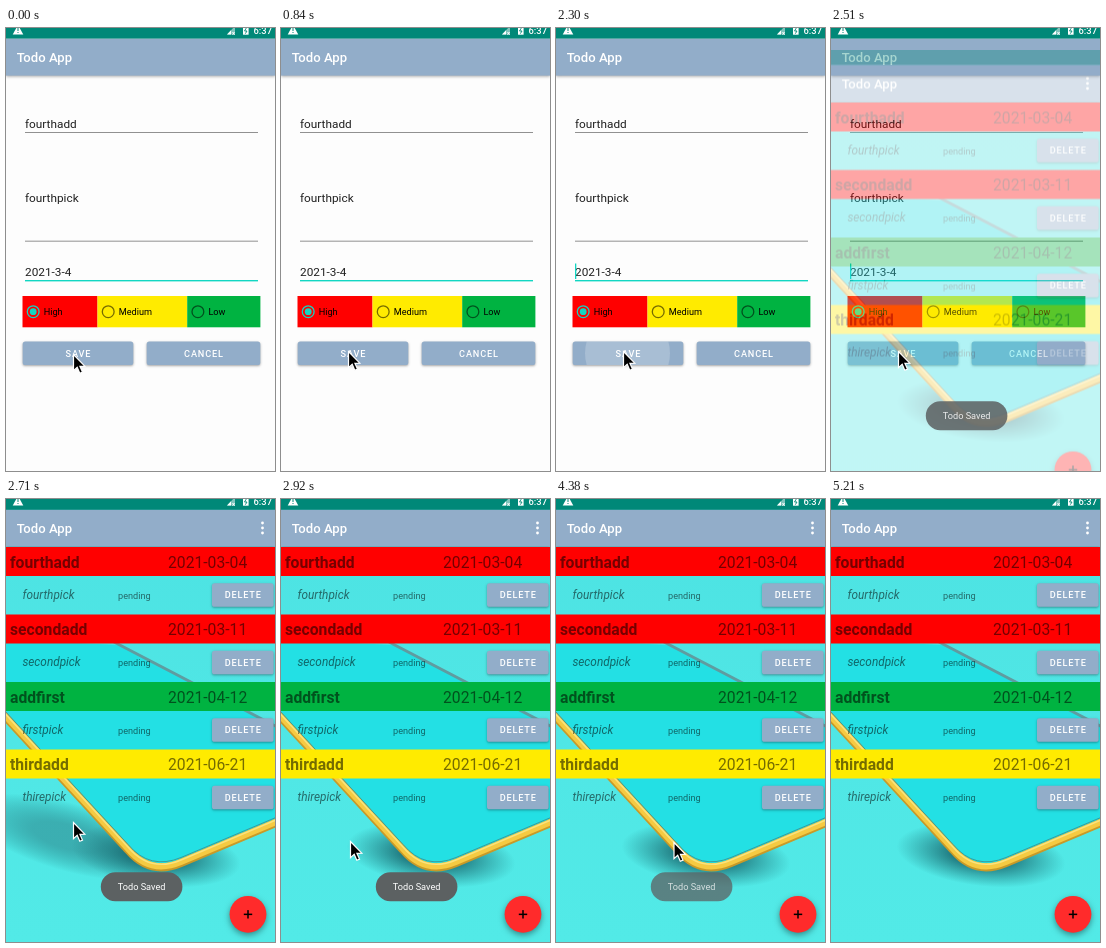
These frames come from a looping animation (269x443 px, 5420 ms). An HTML page with a canvas:

```html
<!DOCTYPE html>
<html lang="en">
<head>
<meta charset="utf-8">
<title>Todo App</title>
<style>
  html, body { margin: 0; width: 100%; height: 100%; overflow: hidden; background: #fdfdfd; }
  canvas { display: block; width: 269px; height: 443px; }
</style>
</head>
<body>
<canvas id="stage" width="269" height="443"></canvas>
<script>
const W = 269, H = 443, LOOP = 5420;
const ctx = document.getElementById('stage').getContext('2d');

const BLUE = '#92adc9', TEAL = '#008878', RED = '#ff0000', GREEN = '#00b341', YELLOW = '#ffeb00';
const MUTED = 'rgba(0,0,0,0.54)', INK = '#202020', ACCENT = '#12d6c2';

const todos = [
  ['fourthadd', '2021-03-04', 'fourthpick', RED],
  ['secondadd', '2021-03-11', 'secondpick', RED],
  ['addfirst', '2021-04-12', 'firstpick', GREEN],
  ['thirdadd', '2021-06-21', 'thirepick', YELLOW]
];

// Stepped tracks: [start time, value...]
const pointerTrack = [
  [0, 67.5, 326.5], [210, 67.5, 323.5], [2920, 69.5, 342.5], [3130, 158, 406.5],
  [3330, 89.5, 352.5], [3540, 109.5, 397.5], [3750, 176, 373.5], [3960, 77.5, 365.5],
  [4170, 144.5, 398.5], [4380, 118, 343.5], [4590, 85.5, 389.5], [4800, 131.5, 407.5],
  [5010, 192.5, 426.5], [5210, -50, -50]
];
const caretTrack = [[0, 0], [210, 1], [840, 0], [1250, 1], [1670, 0], [2300, 1]];
const toastTrack = [[0, 0], [2510, 0.86], [2710, 1], [4380, 0.75], [4590, 0.3], [4800, 0]];

const at = (track, t) => track.filter(key => key[0] <= t).pop().slice(1);

function rect(x, y, w, h, color) {
  ctx.fillStyle = color;
  ctx.fillRect(x, y, w, h);
}

function text(str, x, y, size, color, { style = '', align = 'left', spacing = 0 } = {}) {
  ctx.font = `${style} ${size}px Roboto, sans-serif`;
  ctx.letterSpacing = spacing + 'px';
  ctx.textAlign = align;
  ctx.fillStyle = color;
  ctx.fillText(str, x, y);
  ctx.letterSpacing = '0px';
}

function path(points, close) {
  ctx.beginPath();
  points.forEach(([x, y]) => ctx.lineTo(x, y));
  if (close) ctx.closePath();
}

function disc(x, y, r, color) {
  ctx.beginPath();
  ctx.arc(x, y, r, 0, Math.PI * 2);
  ctx.fillStyle = color;
  ctx.fill();
}

function pill(x, y, w, h, r, color) {
  ctx.beginPath();
  ctx.roundRect(x, y, w, h, r);
  ctx.fillStyle = color;
  ctx.fill();
}

function withShadow(blur, dy, alpha, draw) {
  ctx.save();
  ctx.shadowColor = `rgba(0,0,0,${alpha})`;
  ctx.shadowBlur = blur;
  ctx.shadowOffsetY = dy;
  draw();
  ctx.restore();
}

function button(label, x, y, w, h, ripple) {
  withShadow(2.5, 1, 0.35, () => pill(x, y, w, h, 2.6, BLUE));
  if (ripple) {
    ctx.save();
    ctx.beginPath();
    ctx.roundRect(x, y, w, h, 2.6);
    ctx.clip();
    disc(71.5, y + h / 2, 42.5, 'rgba(255,255,255,0.2)');
    ctx.restore();
  }
  text(label, x + w / 2 + 0.4, y + h / 2 + 3.3, 9.16, '#fff', { style: '500', align: 'center', spacing: 0.82 });
}

function statusBar() {
  rect(0, 0, W, 10.6, TEAL);
  path([[12, -3], [17.3, 6.5], [6.7, 6.5]], true);
  ctx.fillStyle = '#fff';
  ctx.fill();
  rect(11.5, 0, 1, 3, TEAL);
  rect(11.5, 4, 1, 1, TEAL);
  path([[229, -2], [229, 6.5], [221, 6.5]], true);
  ctx.fillStyle = 'rgba(255,255,255,0.5)';
  ctx.fill();
  path([[225, 2.3], [225, 6.5], [221, 6.5]], true);
  ctx.fillStyle = '#fff';
  ctx.fill();
  text('x', 226, 6.5, 6, '#fff', { style: '700' });
  rect(237, -2, 5.6, 8.7, '#fff');
  path([[240.3, 0], [238.5, 3], [241, 3], [239.3, 5.7]]);
  ctx.strokeStyle = TEAL;
  ctx.lineWidth = 0.9;
  ctx.stroke();
  text('6:37', 247.5, 6.2, 9.4, '#fff', { style: '500' });
}

function appBar() {
  withShadow(3, 1, 0.35, () => rect(0, 10.6, W, 37, BLUE));
  text('Todo App', 10.7, 34, 13.1, '#fff', { style: '500' });
}

function radio(label, x, w, color, checked) {
  rect(x, 268, w, 31.3, color);
  const cx = x + 10.7, cy = 283.7;
  const tint = checked ? ACCENT : MUTED;
  ctx.beginPath();
  ctx.arc(cx, cy, 5.9, 0, Math.PI * 2);
  ctx.strokeStyle = tint;
  ctx.lineWidth = 1.3;
  ctx.stroke();
  if (checked) disc(cx, cy, 3.4, tint);
  text(label, x + 21.2, 287, 9.16, '#000');
}

function formScreen(caret, ripple) {
  rect(0, 0, W, H, '#fdfdfd');
  appBar();
  [['fourthadd', 99.5], ['fourthpick', 173.7], ['2021-3-4', 247.7]]
    .forEach(([value, y]) => text(value, 19, y, 11.8, INK));
  rect(19, 104, 233, 0.9, '#858585');
  rect(19, 212.7, 233, 0.9, '#858585');
  rect(19, 252, 233, 1.4, ACCENT);
  if (caret) rect(19, 235.5, 1.3, 15.5, ACCENT);
  radio('High', 16.5, 75, RED, true);
  radio('Medium', 91.5, 89.7, YELLOW);
  radio('Low', 181.2, 73.2, GREEN);
  button('SAVE', 16.7, 313.4, 110.6, 23.6, ripple);
  button('CANCEL', 140.7, 313.4, 113.6, 23.6);
}

function softEllipse(x, y, rx, ry, angle, color) {
  ctx.save();
  ctx.translate(x, y);
  ctx.rotate(angle);
  ctx.scale(rx, ry);
  const g = ctx.createRadialGradient(0, 0, 0.35, 0, 0, 1);
  g.addColorStop(0, color);
  g.addColorStop(1, 'rgba(30,120,125,0)');
  disc(0, 0, 1, g);
  ctx.restore();
}

function phoneOutline() {
  ctx.beginPath();
  ctx.moveTo(-8, 209);
  ctx.lineTo(122, 350);
  ctx.quadraticCurveTo(144, 376, 175, 363);
  ctx.lineTo(277, 320);
}

function wallpaper(settled) {
  const g = ctx.createLinearGradient(0, 40, 0, H);
  g.addColorStop(0, '#4de3e3');
  g.addColorStop(1, '#52eae7');
  rect(0, -20, W, H + 20, g);

  if (!settled) softEllipse(62, 338, 105, 34, 0.28, 'rgba(50,150,155,0.7)');
  softEllipse(150, 356, 85, 31, 0.12, 'rgba(25,105,112,0.85)');

  phoneOutline();
  ctx.lineTo(277, 231);
  ctx.lineTo(112, 146);
  ctx.lineTo(-8, 140);
  ctx.closePath();
  ctx.fillStyle = '#23e0e4';
  ctx.fill();

  path([[108, 143], [277, 231]]);
  ctx.strokeStyle = '#5f9ca0';
  ctx.lineWidth = 3;
  ctx.stroke();
  [['#c89a28', 8, 1], ['#f5ca42', 6, 0], ['#f9e27c', 1.5, -2], ['#3a9c9c', 1, -4.5]].forEach(([color, width, dy]) => {
    ctx.save();
    ctx.translate(0, dy);
    phoneOutline();
    ctx.strokeStyle = color;
    ctx.lineWidth = width;
    ctx.stroke();
    ctx.restore();
  });
}

function listScreen(settled) {
  wallpaper(settled);
  rect(0, -5, W, 15.6, TEAL);
  appBar();
  [24, 29, 34].forEach(y => disc(256.5, y, 1.4, '#fff'));
  todos.forEach(([title, date, note, color], i) => {
    const y = 48 + i * 67.5;
    rect(0, y, W, 29, color);
    text(title, 4, y + 20.6, 15.7, MUTED, { style: '700' });
    text(date, 162, y + 20.6, 15.7, MUTED);
    text(note, 16.4, y + 51.7, 11.8, MUTED, { style: 'italic' });
    text('pending', 112, y + 51.5, 9.16, MUTED);
    button('DELETE', 206, y + 36.2, 61.6, 23.6);
  });
  withShadow(6, 2.5, 0.4, () => disc(242, 415.3, 18.4, '#ff2b2b'));
  rect(237.8, 414.6, 8.4, 1.5, '#000');
  rect(241.25, 411.1, 1.5, 8.4, '#000');
}

// Renders the list off to the side so the crossfade applies to it as a whole.
const main = ctx.canvas;
const layer = document.createElement('canvas');
layer.width = W;
layer.height = H + 10;
let draw = null;

function crossfadeLayer() {
  const layerCtx = layer.getContext('2d');
  ctx.clearRect(0, 0, W, H);
  ctx.save();
  ctx.translate(0, 5);
  listScreen(true);
  ctx.restore();
  layerCtx.clearRect(0, 0, W, layer.height);
  layerCtx.drawImage(main, 0, 0);
}

function toast(alpha) {
  if (!alpha) return;
  ctx.save();
  ctx.globalAlpha = alpha;
  pill(94.8, 373.2, 81.6, 29, 14.5, '#5c6162');
  text('Todo Saved', 135.6, 391.2, 9.16, '#fff', { align: 'center' });
  ctx.restore();
}

function pointer(x, y) {
  ctx.save();
  ctx.translate(x, y);
  path([[0, 0], [0, 16.2], [3.7, 12.8], [6.3, 18.8], [9, 17.6], [6.4, 11.8], [11.3, 11.6]], true);
  ctx.fillStyle = '#000';
  ctx.strokeStyle = '#fff';
  ctx.lineWidth = 1.2;
  ctx.fill();
  ctx.stroke();
  ctx.restore();
}

function render(t) {
  const fading = t >= 2510 && t < 2710;
  if (fading) crossfadeLayer();
  if (t < 2710) {
    formScreen(at(caretTrack, t)[0], t >= 2300 && t < 2510);
  } else {
    listScreen(t >= 2920);
  }
  if (fading) {
    ctx.globalAlpha = 0.35;
    ctx.drawImage(layer, 0, 21.5);
    ctx.globalAlpha = 1;
  }
  statusBar();
  toast(at(toastTrack, t)[0]);
  pointer(...at(pointerTrack, t));
}

const start = performance.now();
function tick() {
  render((performance.now() - start) % LOOP);
  requestAnimationFrame(tick);
}
tick();
</script>
</body>
</html>
```
